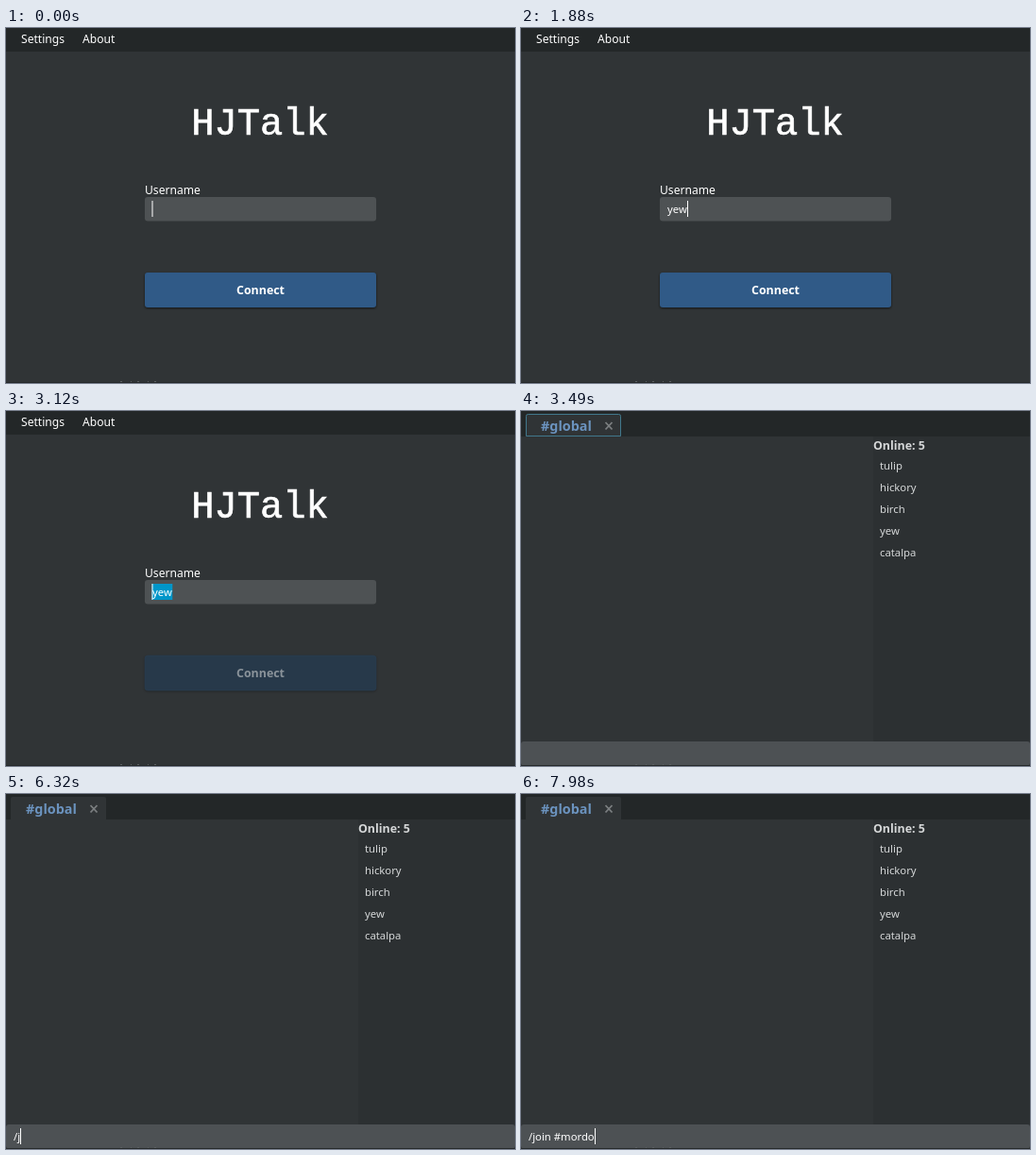
An HTML page that plays this animation: 539x376 px, repeating every 8 s.

```html
<!DOCTYPE html>
<html lang="en">
<head>
<meta charset="utf-8">
<title>Chat client</title>
<style>
  html, body { margin: 0; width: 100%; height: 100%; overflow: hidden; background: #303436; }
  svg { display: block; width: 100vw; height: 100vh; }
  text { font: 12.1px "Noto Sans", "Open Sans", sans-serif; fill: #fff; white-space: pre; }
  .title { font: 40.4px "Liberation Mono", monospace; text-anchor: middle; stroke: #fff; stroke-width: .7; }
  .small { font-size: 11.3px; }
  .user { fill: #d5d7d8; }
  .bold { font-weight: 700; font-size: 12.4px; }
  .tab { font-weight: 700; font-size: 14.4px; fill: #6b93bf; }
  .button { fill: #305a87; filter: drop-shadow(0 1px 1px #0009); }
  .disabled .button { fill: #27394a; stroke: #2a4055; stroke-width: .5; filter: drop-shadow(0 1px 1px #0004); }
  .disabled text { fill: #8a939a; }
  .caret { width: 1px; height: 17px; fill: #fff; }
  [hidden] { display: none; }
</style>
</head>
<body>
<svg viewBox="0 0 539 376">
  <rect width="539" height="376" fill="#303436"/>

  <g id="login">
    <rect width="539" height="25" fill="#232728"/>
    <text x="16" y="16">Settings</text>
    <text x="81" y="16">About</text>
    <text class="title" x="269" y="113">HJTalk</text>
    <text x="147" y="176">Username</text>
    <rect x="147" y="179" width="245" height="25.5" rx="3" fill="#4e5254"/>
    <rect id="selection" x="154.5" y="183" height="17" fill="#0096c9"/>
    <text id="name" class="small" x="155" y="196"></text>
    <rect id="nameCaret" class="caret" y="183"/>
    <g id="connect">
      <rect class="button" x="147" y="259" width="245" height="37" rx="3"/>
      <text class="bold" x="269.5" y="282" text-anchor="middle">Connect</text>
    </g>
  </g>

  <g id="chat">
    <rect width="539" height="27" fill="#232728"/>
    <path d="M5 27V5q0-2 2-2h97q2 0 2 2v22z" fill="#303436"/>
    <path id="tabFocus" d="M5.5 26.5v-21q0-2 2-2h96q2 0 2 2v21z" fill="none" stroke="#41788c"/>
    <text class="tab" x="21" y="21">#global</text>
    <path d="M89.5 12l7 7.5m0-7.5l-7 7.5" stroke="#7b7f81" stroke-width="1.8"/>
    <rect x="373" y="27" width="166" height="323" fill="#2c3032"/>
    <text class="bold user" x="373" y="41">Online: 5</text>
    <g id="users"></g>
    <rect y="350" width="539" height="25.5" rx="3" fill="#4d5154"/>
    <text id="message" class="small" x="8" y="367"></text>
    <rect id="messageCaret" class="caret" y="354"/>
  </g>

  <path d="M0 375.5h539" stroke="#25292a"/>
  <path d="M121 374.5h45" stroke="#5b5f61" stroke-dasharray="2 9 1 6"/>
</svg>
<script>
const LOOP = 8000;
const CHAT_OPENS = 3490;
const el = id => document.getElementById(id);
const show = (id, visible) => el(id).toggleAttribute('hidden', !visible);
const within = (t, from, to) => t >= from && t < to;

const nameKeys = [1370, 1560, 1880];
const messageKeys = [5950, 6320, 6500, 6780, 6820, 6960, 7150, 7290, 7520, 7700, 7840, 7980];

['tulip', 'hickory', 'birch', 'yew', 'catalpa'].forEach((user, i) => {
  const label = document.createElementNS('http://www.w3.org/2000/svg', 'text');
  label.setAttribute('class', 'small user');
  label.setAttribute('x', 380);
  label.setAttribute('y', 62 + 23 * i);
  label.textContent = user;
  el('users').append(label);
});

// Shows the letters typed so far and returns their width.
function type(id, text, keys, t) {
  const typed = text.slice(0, keys.filter(key => key <= t).length);
  el(id).textContent = typed;
  return typed ? el(id).getComputedTextLength() : 0;
}

// An empty field has its caret half a pixel before the text.
function placeCaret(id, left, offset, visible) {
  show(id, visible);
  el(id).setAttribute('x', offset ? Math.round(left + offset) : left - 0.5);
}

function draw() {
  const t = performance.now() % LOOP;
  const chatOpen = t >= CHAT_OPENS;
  show('login', !chatOpen);
  show('chat', chatOpen);

  if (chatOpen) {
    const width = type('message', '/join #mordo', messageKeys, t);
    show('tabFocus', t < 4880);
    placeCaret('messageCaret', 8, width, within(t, 4930, 5440) || t >= 5860);
  } else {
    const width = type('name', 'yew', nameKeys, t);
    const selected = t >= 3120;
    show('selection', selected);
    el('selection').setAttribute('width', width + 1);
    el('connect').classList.toggle('disabled', t >= 2990);
    placeCaret('nameCaret', 155, selected ? 0 : width,
      !within(t, 450, 910) && !within(t, 2340, 2850));
  }
  requestAnimationFrame(draw);
}
draw();
</script>
</body>
</html>
```
